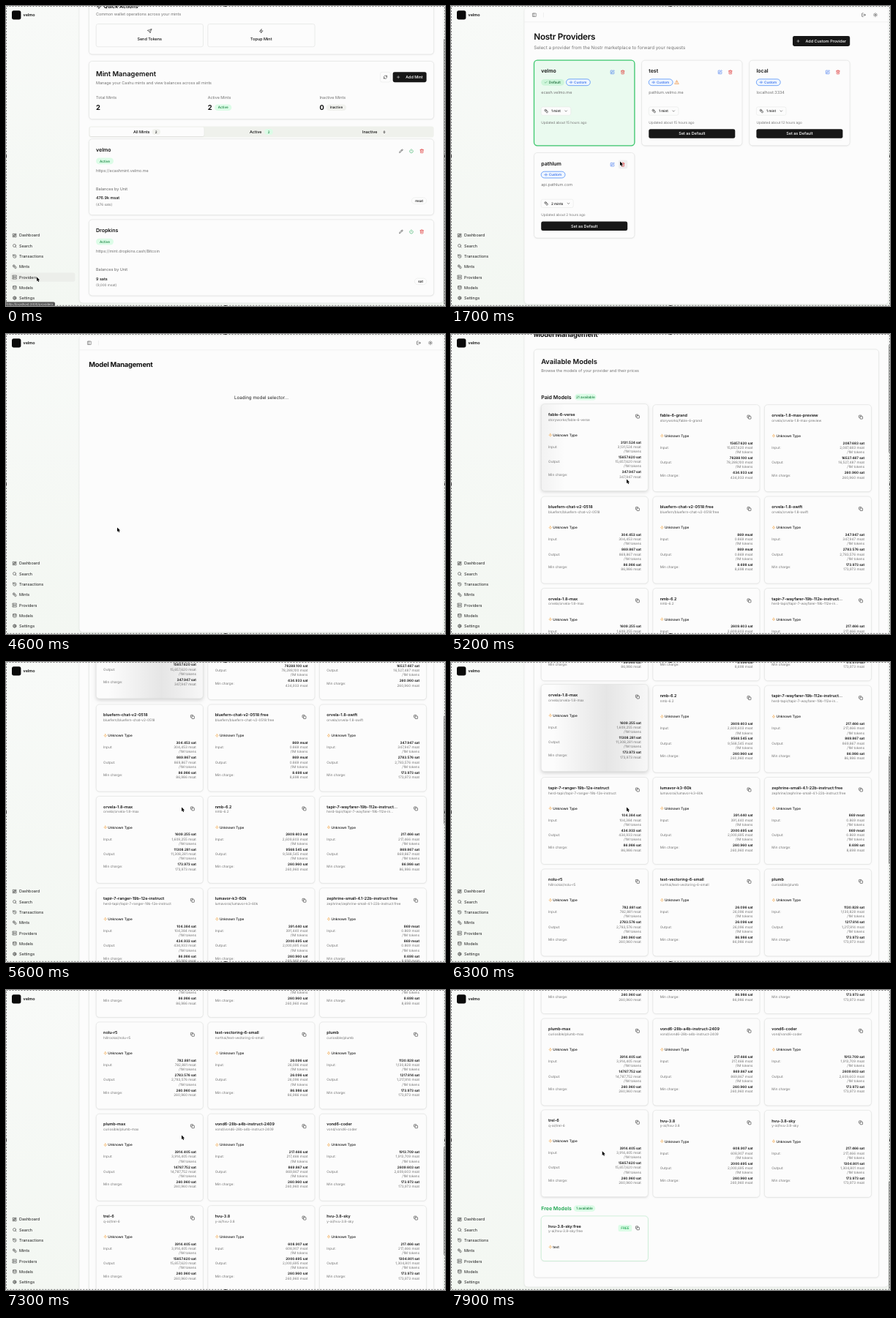
An HTML page with a canvas that plays this animation: 600x410 px, repeating every 8000 ms.

```html
<!DOCTYPE html>
<html lang="en">
<head>
<meta charset="utf-8">
<title>Wallet dashboard</title>
<style>
html, body { margin: 0; width: 100%; height: 100%; overflow: hidden; background: #f6f9f5; }
canvas { display: block; width: 600px; height: 410px; }
</style>
</head>
<body>
<canvas id="stage"></canvas>
<script>
const W = 600, H = 410, LOOP = 8000, K = 0.3906;
const INK = '#0f0f0f', MUTED = '#737373', LINE = '#e3e4e3', GREEN = '#16a34a',
  MINT = '#dcfce7', RED = '#dc2626', BLUE = '#2563eb', PAGE = '#fcfcfc';

const canvas = document.getElementById('stage');
const dpr = window.devicePixelRatio || 1;
canvas.width = W * dpr;
canvas.height = H * dpr;
const ctx = canvas.getContext('2d');

// Icons on a 24 unit grid
const ICONS = {
  dash: 'M3 3h7v9H3zM14 3h7v5h-7zM14 12h7v9h-7zM3 16h7v5H3z',
  search: 'M19 11a8 8 0 1 1-16 0a8 8 0 0 1 16 0M21 21l-4.3-4.3',
  history: 'M3 12a9 9 0 1 0 9-9a9.75 9.75 0 0 0-6.74 2.74L3 8M3 3v5h5M12 7v5l4 2',
  coins: 'M14 8a6 6 0 1 1-12 0a6 6 0 0 1 12 0M18.1 10.4A6 6 0 1 1 10.3 18M7 6h1v4M16.7 13.9l.7.7-2.8 2.8',
  server: 'M2 2h20v8H2zM2 14h20v8H2zM6 6h.1M6 18h.1',
  data: 'M3 5a9 3 0 1 0 18 0a9 3 0 1 0-18 0M3 5v14a9 3 0 0 0 18 0V5M3 12a9 3 0 0 0 18 0',
  gear: 'M15 12a3 3 0 1 1-6 0a3 3 0 0 1 6 0M20 12a8 8 0 1 1-16 0a8 8 0 0 1 16 0M12 2v3M12 19v3M2 12h3M19 12h3M5 5l2 2M17 17l2 2M5 19l2-2M17 7l2-2',
  send: 'M22 2L15 22L11 13L2 9zM22 2L11 13',
  zap: 'M13 2L3 14h9l-1 8L21 10h-9z',
  refresh: 'M3 12a9 9 0 0 1 15.7-6.3L21 8M21 3v5h-5M21 12a9 9 0 0 1-15.7 6.3L3 16M3 21v-5h5',
  plus: 'M5 12h14M12 5v14',
  pen: 'M17 3a2.8 2.8 0 1 1 4 4L7.5 20.5L2 22l1.5-5.5zM14 6l4 4',
  power: 'M12 2v10M18.4 6.6a9 9 0 1 1-12.8 0',
  trash: 'M3 6h18M19 6v14a2 2 0 0 1-2 2H7a2 2 0 0 1-2-2V6M8 6V4a2 2 0 0 1 2-2h4a2 2 0 0 1 2 2v2M10 11v6M14 11v6',
  panel: 'M3 3h18v18H3zM9 3v18',
  logout: 'M9 21H5a2 2 0 0 1-2-2V5a2 2 0 0 1 2-2h4M16 17l5-5-5-5M21 12H9',
  sun: 'M16 12a4 4 0 1 1-8 0a4 4 0 0 1 8 0M12 2v2M12 20v2M2 12h2M20 12h2M5 5l1.4 1.4M17.6 17.6L19 19M5 19l1.4-1.4M17.6 6.4L19 5',
  edit: 'M12 3H5a2 2 0 0 0-2 2v14a2 2 0 0 0 2 2h14a2 2 0 0 0 2-2v-7M18.4 2.6a2 2 0 0 1 3 3L12 15l-4 1 1-4z',
  check: 'M20 6L9 17l-5-5',
  eye: 'M2 12s3.5-7 10-7 10 7 10 7-3.5 7-10 7-10-7-10-7M15 12a3 3 0 1 1-6 0a3 3 0 0 1 6 0',
  warn: 'M12 3L22 21H2zM12 9v5M12 17.5h.1',
  down: 'M6 9l6 6 6-6',
  copy: 'M10 8h10a2 2 0 0 1 2 2v10a2 2 0 0 1-2 2H10a2 2 0 0 1-2-2V10a2 2 0 0 1 2-2M4 16a2 2 0 0 1-2-2V4a2 2 0 0 1 2-2h10a2 2 0 0 1 2 2',
  spark: 'M12 3l2.4 6.6L21 12l-6.6 2.4L12 21l-2.4-6.6L3 12l6.6-2.4z'
};
for (const k in ICONS) ICONS[k] = new Path2D(ICONS[k]);

const NAV = [['dash', 'Dashboard'], ['search', 'Search'], ['history', 'Transactions'], ['coins', 'Mints'],
  ['server', 'Providers'], ['data', 'Models'], ['gear', 'Settings']];

// name, vendor, then input, output and minimum price in msat
const MODELS = [
  ['fable-6-verse', 'storyworks', 3131524, 15657620, 347947],
  ['fable-6-grand', 'storyworks', 15657620, 78288100, 434933],
  ['orvela-1.8-max-preview', 'orvela', 2087683, 16527487, 260960],
  ['bluefern-chat-v2-0518', 'bluefern', 304453, 869867, 86986],
  ['bluefern-chat-v2-0518:free', 'bluefern', 869, 869, 8698],
  ['orvela-1.8-swift', 'orvela', 347947, 2783576, 173973],
  ['orvela-1.8-max', 'orvela', 1609255, 11308281, 173973],
  ['nmb-6.2', '', 2609603, 9568545, 260960],
  ['tapir-7-wayfarer-19b-112e-instruct...', 'herd-tapir', 217466, 869867, 86986],
  ['tapir-7-ranger-19b-12e-instruct', 'herd-tapir', 104384, 434933, 86986],
  ['lumavor-k3-60k', 'lumavorai', 391440, 2000695, 260960],
  ['zephrine-small-4.1-22b-instruct:free', 'zephrine', 869, 869, 8698],
  ['nolu-r5', 'hillrockai', 782881, 2783576, 260960],
  ['text-vectoring-6-small', 'northai', 26096, 26096, 86986],
  ['plumb', 'curiosible', 1130828, 1217814, 173973],
  ['plumb-max', 'curiosible', 3914405, 14787752, 260960],
  ['vond6-28b-a4b-instruct-2409', 'vond', 217466, 869867, 260960],
  ['vond6-coder', 'vond', 1913709, 2609603, 173973],
  ['trel-6', 'q-ai', 3914405, 15657620, 260960],
  ['hvu-3.8', 'y-ai', 608907, 2000695, 260960],
  ['hvu-3.8-sky', 'y-ai', 217466, 1304801, 173973]
];

// Keyframes: [time, value...]
const SCROLL = [[5100, 0], [5600, 205], [5800, 222], [6300, 356.3], [6800, 432.5], [7700, 725.7]];
const CURSOR = [[600, 42, 370.5], [1600, 231, 212.5], [1900, 231, 212.5], [2300, 297, 130], [2500, 297, 130],
  [2700, 303, 112], [3400, 40, 388], [3800, 28, 383], [4300, 28, 383], [4600, 152, 264.5],
  [5000, 240, 198.5], [7400, 240, 198.5], [7900, 206.7, 220.3]];
// Hovered model cards: index, from, to
const HOVERS = [[0, 5100, 5800], [6, 5800, 7300], [18, 7900, 9000]];

function track(keys, t) {
  if (t <= keys[0][0]) return keys[0].slice(1);
  for (let i = 1; i < keys.length; i++) {
    const a = keys[i - 1], b = keys[i];
    if (t < b[0]) {
      const p = (t - a[0]) / (b[0] - a[0]);
      return a.slice(1).map((v, n) => v + (b[n + 1] - v) * p);
    }
  }
  return keys[keys.length - 1].slice(1);
}

// Size is in CSS pixels of the pictured screen; y is the middle of the capitals
function text(s, x, y, size = 14, color = INK, weight = 400, align = 'left', spacing = 0) {
  const px = size * K;
  ctx.font = `${weight} ${px}px Inter, sans-serif`;
  ctx.letterSpacing = spacing * px + 'px';
  ctx.fillStyle = color;
  ctx.textAlign = align;
  ctx.fillText(s, x, y + px * 0.36);
}

function box(x, y, w, h, r, fill, stroke, lw = 0.5) {
  ctx.beginPath();
  ctx.roundRect(x, y, w, h, r);
  if (fill) { ctx.fillStyle = fill; ctx.fill(); }
  if (stroke) { ctx.strokeStyle = stroke; ctx.lineWidth = lw; ctx.stroke(); }
}

function shadowed(color, blur, dy, draw) {
  ctx.save();
  ctx.shadowColor = color;
  ctx.shadowBlur = blur * dpr;
  ctx.shadowOffsetY = dy * dpr;
  draw();
  ctx.restore();
}

function card(x, y, w, h, stroke = LINE, fill = PAGE, lift = 0) {
  shadowed(`rgba(0,0,0,${0.1 + lift * 0.07})`, 1.5 + lift * 4, 0.6 + lift * 1.7,
    () => box(x, y, w, h, 4.5, fill));
  box(x, y, w, h, 4.5, null, stroke, 0.7);
}

function icon(name, cx, cy, color = INK, size = 6.25) {
  const k = size / 24;
  ctx.save();
  ctx.translate(cx - size / 2, cy - size / 2);
  ctx.scale(k, k);
  ctx.strokeStyle = color;
  ctx.lineWidth = 2;
  ctx.lineCap = ctx.lineJoin = 'round';
  ctx.stroke(ICONS[name]);
  ctx.restore();
}

function badge(s, x, y, w, fill = MINT, color = '#15803d', stroke = null, h = 8.6) {
  box(x, y - h / 2, w, h, h / 2, fill, stroke);
  text(s, x + w / 2, y, 12, color, 500, 'center');
}

function button(s, x, y, w, h, plus) {
  box(x, y, w, h, 2.4, '#171717');
  if (plus) icon('plus', x + 7.5, y + h / 2, '#fff', 5.6);
  text(s, plus ? x + 17.5 : x + w / 2, y + h / 2, 14, '#fff', 500, plus ? 'left' : 'center');
}

function pagePanel(top, bottom) {
  shadowed('rgba(0,0,0,.14)', 2, 0.4, () => box(100.3, top, 497.2, bottom - top, 4.7, PAGE));
}

function header() {
  icon('panel', 114, 12.2, '#333', 5.8);
  ctx.fillStyle = LINE;
  ctx.fillRect(126.2, 9, 0.5, 6.5);
  icon('logout', 564, 12.2, '#222');
  icon('sun', 580, 12.2, '#222');
  ctx.fillStyle = '#e6e7e6';
  ctx.fillRect(100.3, 21.6, 497.2, 0.6);
}

function mintCard(y, name, url, amount, note, unit, unitW) {
  card(113.3, y, 471.4, 104);
  text(name, 123, y + 15, 18, INK, 600);
  badge('Active', 123, y + 30.2, 24);
  text(url, 123, y + 43.6, 14, MUTED);
  text('Balances by Unit', 123, y + 68.2, 14, '#666');
  text(amount, 123, y + 80.8, 14, INK, 500);
  text(note, 123, y + 89.3, 12, MUTED);
  icon('pen', 540, y + 16.5, INK, 5.6);
  icon('power', 554, y + 16.5, GREEN);
  icon('trash', 568.3, y + 16.5, RED);
  badge(unit, 574.8 - unitW, y + 84.5, unitW, PAGE, INK, LINE);
}

function mintsPage() {
  pagePanel(-20, 405.7);
  card(113.3, -40, 471.4, 106);
  icon('zap', 127, 0.5, INK, 7.8);
  text('Quick Actions', 133.5, 0.5, 18, INK, 600);
  text('Common wallet operations across your mints', 123, 11.3, 14, MUTED);
  [['send', 'Send Tokens'], ['zap', 'Topup Mint']].forEach(([ic, s], i) => {
    const x = 123.2 + i * 152.6;
    box(x, 24.6, 146.3, 31.2, 2.6, PAGE, LINE, 0.7);
    icon(ic, x + 73, 34.4);
    text(s, x + 73, 45, 14, INK, 500, 'center');
  });

  card(113.3, 75.4, 471.4, 79.3);
  text('Mint Management', 123, 92.2, 24, INK, 600);
  text('Manage your Cashu mints and view balances across all mints', 123, 105.3, 14, MUTED);
  box(511.6, 90.4, 13.8, 13.6, 2.4, PAGE, LINE);
  icon('refresh', 518.5, 97.2, INK, 5.6);
  button('Add Mint', 528.7, 90.2, 46, 14, true);
  [['Total Mints', '2'], ['Active Mints', '2'], ['Inactive Mints', '0']].forEach(([s, n], i) => {
    text(s, 123 + i * 152.7, 125.2, 14, MUTED);
    text(n, 123 + i * 152.7, 139, 24, INK, 700);
  });
  badge('Active', 285, 138.8, 23.4);
  badge('Inactive', 437.6, 138.8, 27.6, '#f1f2ee', INK);

  box(113.3, 164.4, 471.4, 15, 3, '#eff1ec');
  shadowed('rgba(0,0,0,.12)', 1, 0.4, () => box(114.3, 165.5, 156.5, 12.8, 2.4, PAGE));
  [['All Mints', 174, 199.6, '2', '#f1f2ee'], ['Active', 333, 353.4, '2', MINT], ['Inactive', 487, 511.2, '0', '#f1f2ee']]
    .forEach(([s, x, bx, n, fill]) => {
      text(s, x, 172, 14, INK, 500);
      badge(n, bx, 172, 11.4, fill, fill === MINT ? '#15803d' : INK, null, 8);
    });
  mintCard(181.7, 'velmo', 'https://ecashmint.velmo.me', '476.9k msat', '(476 sats)', 'msat', 20.4);
  mintCard(291.9, 'Dropkins', 'https://mint.dropkins.cash/Bitcoin', '9 sats', '(9,000 msat)', 'sat', 16.4);
  scrollbar(45, 408);
}

function providerCard(x, y, name, url, mints, age, flags = {}) {
  const { active, warn, hot } = flags;
  card(x, y, 137.4, 116.6, LINE, active ? '#eafaef' : PAGE);
  if (active) box(x, y, 137.4, 116.6, 4.5, null, '#3ecb70', 1.3);
  const l = x + 9.7;
  text(name, l, y + 14.7, 18, INK, 600);
  if (hot) box(x + 115.3, y + 10, 12.5, 12, 2.4, '#efeff0');
  icon('edit', x + 107, y + 16.2, BLUE);
  icon('trash', x + 121.2, y + 16.2, RED);
  let bx = l;
  if (active) {
    box(l, y + 25.7, 31.6, 8.8, 4.4, '#cdf5da');
    icon('check', l + 6.5, y + 30.1, '#15803d', 4.7);
    text('Default', l + 10.6, y + 30.1, 12, '#166534', 500);
    bx += 34.3;
  }
  box(bx, y + 25.7, 32.8, 8.8, 4.4, '#eff6ff', '#3b82f6', 0.7);
  icon('eye', bx + 6.6, y + 30.1, BLUE, 4.7);
  text('Custom', bx + 10.6, y + 30.1, 12, BLUE, 500);
  if (warn) icon('warn', bx + 38.4, y + 30, '#ea7a17');
  text(url, l, y + 43.6, 14, MUTED);
  const bw = mints > 1 ? 44 : 40.6;
  box(l, y + 63.7, bw, 11.4, 2.4, PAGE, LINE);
  icon('coins', l + 7, y + 69.4, INK, 5.6);
  text(mints > 1 ? mints + ' mints' : '1 mint', l + 13.7, y + 69.4, 12, INK, 500);
  icon('down', l + bw - 6.7, y + 69.4, INK, 5.6);
  text(`Updated about ${age} hours ago`, l, y + 84.8, 12, MUTED);
  if (!active) button('Set as Default', l, y + 94, 118, 12.6);
}

function providersPage(t) {
  pagePanel(2.2, 407.4);
  header();
  text('Nostr Providers', 113.3, 42.2, 30, INK, 600, 'left', -0.025);
  text('Select a provider from the Nostr marketplace to forward your requests', 113.3, 57, 16, MUTED);
  button('Add Custom Provider', 467, 41, 78.2, 14, true);
  providerCard(113.5, 74.2, 'velmo', 'ecash.velmo.me', 1, 15, { active: true });
  providerCard(260.6, 74.2, 'test', 'pathlum.velmo.me', 1, 15, { warn: true });
  providerCard(407.7, 74.2, 'local', 'localhost:3334', 1, 12);
  providerCard(113.5, 200.5, 'pathlum', 'api.pathlum.com', 2, 2, { hot: t >= 1600 && t < 2000 });
}

// The label is centred on its two or three lines of values
function price(label, v, right, left, y, perToken) {
  const big = v >= 1000;
  text(big ? (v / 1000).toFixed(3) + ' sat' : v + ' msat', right, y, 12, INK, 600, 'right');
  text((big ? v.toLocaleString('en-US') : (v / 1000).toFixed(3)) + ' msat', right, y + 6.3, 12, MUTED, 400, 'right');
  if (perToken) text('/1M tokens', right, y + 12.5, 12, MUTED, 400, 'right');
  text(label, left, y + (perToken ? 6.3 : 3.1), 12, MUTED);
}

function shimmer(x, y, w, h, p) {
  if (p <= 0 || p >= 1) return;
  const start = x + w * (2 * p - 1);
  const g = ctx.createLinearGradient(start, 0, start + w, 0);
  g.addColorStop(0, 'rgba(0,0,0,0)');
  g.addColorStop(0.5, 'rgba(0,0,0,.09)');
  g.addColorStop(1, 'rgba(0,0,0,0)');
  ctx.save();
  ctx.beginPath();
  ctx.roundRect(x, y, w, h, 4.5);
  ctx.clip();
  ctx.fillStyle = g;
  ctx.fillRect(start, y, w, h);
  ctx.restore();
}

function modelCard(i, x, y, t) {
  const [name, vendor, input, output, least] = MODELS[i];
  const hover = HOVERS.find(h => h[0] === i && t >= h[1] && t < h[2]);
  const lift = hover ? Math.min(1, (t - hover[1] + 100) / 300) : 0;
  const l = x + 9.9, r = x + 136.7;
  y -= 1.56 * lift;
  card(x, y, 146.2, 119, LINE, PAGE, lift);
  if (hover) shimmer(x, y, 146.2, 119, (t - hover[1]) / 900);
  let path = vendor ? vendor + '/' + name : name;
  if (name.endsWith('...')) path = path.replace('instruct', 'in');
  text(name, l, y + 14.3, 14, INK, 600);
  text(path, l, y + 21.4, 12, MUTED);
  icon('copy', x + 131.7, y + 17, INK, 6);
  icon('spark', l + 2.7, y + 42.6, '#f2a03a', 5.4);
  text('Unknown Type', l + 6.2, y + 42.6, 12, INK, 500);
  price('Input:', input, r, l, y + 52.3, true);
  price('Output:', output, r, l, y + 72.7, true);
  price('Min charge:', least, r, l, y + 93.2, false);
}

function freeCard(y) {
  card(123.2, y, 146.2, 61.5, '#bdeccd');
  text('hvu-3.8-sky:free', 133.1, y + 13.8, 14, INK, 600);
  text('y-ai/hvu-3.8-sky:free', 133.1, y + 20.9, 12, MUTED);
  box(228.6, y + 12, 18.6, 9.2, 2.2, MINT);
  text('FREE', 237.9, y + 16.6, 12, GREEN, 500, 'center');
  icon('copy', 254.9, y + 16.4, INK, 6);
  icon('spark', 135.8, y + 42.4, '#f2a03a', 5.4);
  text('text', 139.3, y + 42.4, 12, INK, 500);
}

function groupTitle(s, count, x, y, color) {
  text(s, 123.2, y, 18, color, 600);
  badge(count + ' available', x, y, 29.6);
}

function modelsPage(t) {
  if (t < 4800) {
    pagePanel(2.2, 407.4);
    header();
    text('Model Management', 113.3, 41.3, 24, INK, 700, 'left', -0.025);
    text('Loading model selector...', 349, 87, 16, '#222', 400, 'center');
    return;
  }
  const scroll = track(SCROLL, t)[0], top = 137.6, pitch = 125.4;
  ctx.save();
  ctx.translate(0, -scroll);
  pagePanel(2.2, 1131.4);
  header();
  text('Model Management', 113.3, 41.3, 24, INK, 700, 'left', -0.025);
  card(113.3, 62, 471.4, 1056.7);
  text('Available Models', 123.2, 78.5, 24, INK, 600);
  text('Browse the models of your provider and their prices', 123.2, 91.5, 14, MUTED);
  groupTitle('Paid Models', MODELS.length, 169, top - 10.5, INK);
  MODELS.forEach((m, i) => {
    const y = top + Math.floor(i / 3) * pitch;
    if (y - scroll < H && y + 125 > scroll) modelCard(i, 123.2 + (i % 3) * 152.6, y, t);
  });
  groupTitle('Free Models', 1, 167.6, 1024.2, GREEN);
  freeCard(1034.6);
  ctx.restore();
  const unit = 409 / 1135;
  scrollbar(scroll * unit, (scroll + 409) * unit);
}

function scrollbar(y0, y1) {
  box(598, y0, 1.6, y1 - y0, 0.8, 'rgba(0,0,0,.32)');
}

function sidebar(hovered) {
  box(8, 6.2, 12.4, 12.2, 2.6, '#0a0a0a');
  text('velmo', 23.6, 12.5, 14, INK, 600);
  NAV.forEach(([ic, s], i) => {
    const y = 313.5 + i * 14.27;
    if (i === hovered) box(6, y - 6.2, 88.4, 12.4, 2.4, '#eceeea');
    icon(ic, 11.8, y, '#222', 6);
    text(s, 18, y, 14, '#1c1c1c');
  });
}

function status(s, w) {
  box(0, 404.4, w, 6, [0, 2, 0, 0], '#555');
  text(s, 1, 407.5, 11, '#e4e4e4');
}

function frameEdge() {
  ctx.strokeStyle = '#777';
  ctx.lineWidth = 1;
  ctx.setLineDash([2, 2]);
  ctx.strokeRect(0.5, 0.5, W - 1, H - 1.2);
  ctx.setLineDash([]);
  ctx.fillStyle = '#333';
  for (const x of [0, W - 1]) ctx.fillRect(x, 204, 1, 2.5);
  for (const y of [0, H - 1]) ctx.fillRect(298.5, y, 3, 1);
}

function pointer([x, y]) {
  ctx.save();
  ctx.translate(x, y);
  ctx.beginPath();
  [[0, 0], [0, 5.6], [1.3, 4.5], [2.2, 6.5], [3.2, 6], [2.4, 4.1], [4.1, 4]].forEach(p => ctx.lineTo(...p));
  ctx.closePath();
  ctx.strokeStyle = '#fff';
  ctx.lineWidth = 1;
  ctx.stroke();
  ctx.fillStyle = '#000';
  ctx.fill();
  ctx.restore();
}

function draw(t) {
  ctx.setTransform(dpr, 0, 0, dpr, 0, 0);
  ctx.textRendering = 'geometricPrecision';
  const bg = ctx.createLinearGradient(0, 0, 0, H);
  bg.addColorStop(0, '#f8faf8');
  bg.addColorStop(1, '#f3f7f2');
  ctx.fillStyle = bg;
  ctx.fillRect(0, 0, W, H);
  if (t < 400) mintsPage();
  else if (t < 4200) providersPage(t);
  else modelsPage(t);
  const hovered = t < 700 ? 4 : t >= 3500 && t < 4400 ? 5 : -1;
  sidebar(hovered);
  if (t < 100) status('http://localhost:3000/providers', 67);
  if (t >= 4000 && t < 4200) status('http://localhost:3000/models', 63);
  frameEdge();
  pointer(track(CURSOR, t));
}

const STEP = 100, begin = performance.now();
function tick() {
  const t = Math.max(0, performance.now() - begin) % LOOP;
  draw(Math.floor(t / STEP) * STEP);
  requestAnimationFrame(tick);
}
tick();
</script>
</body>
</html>
```
